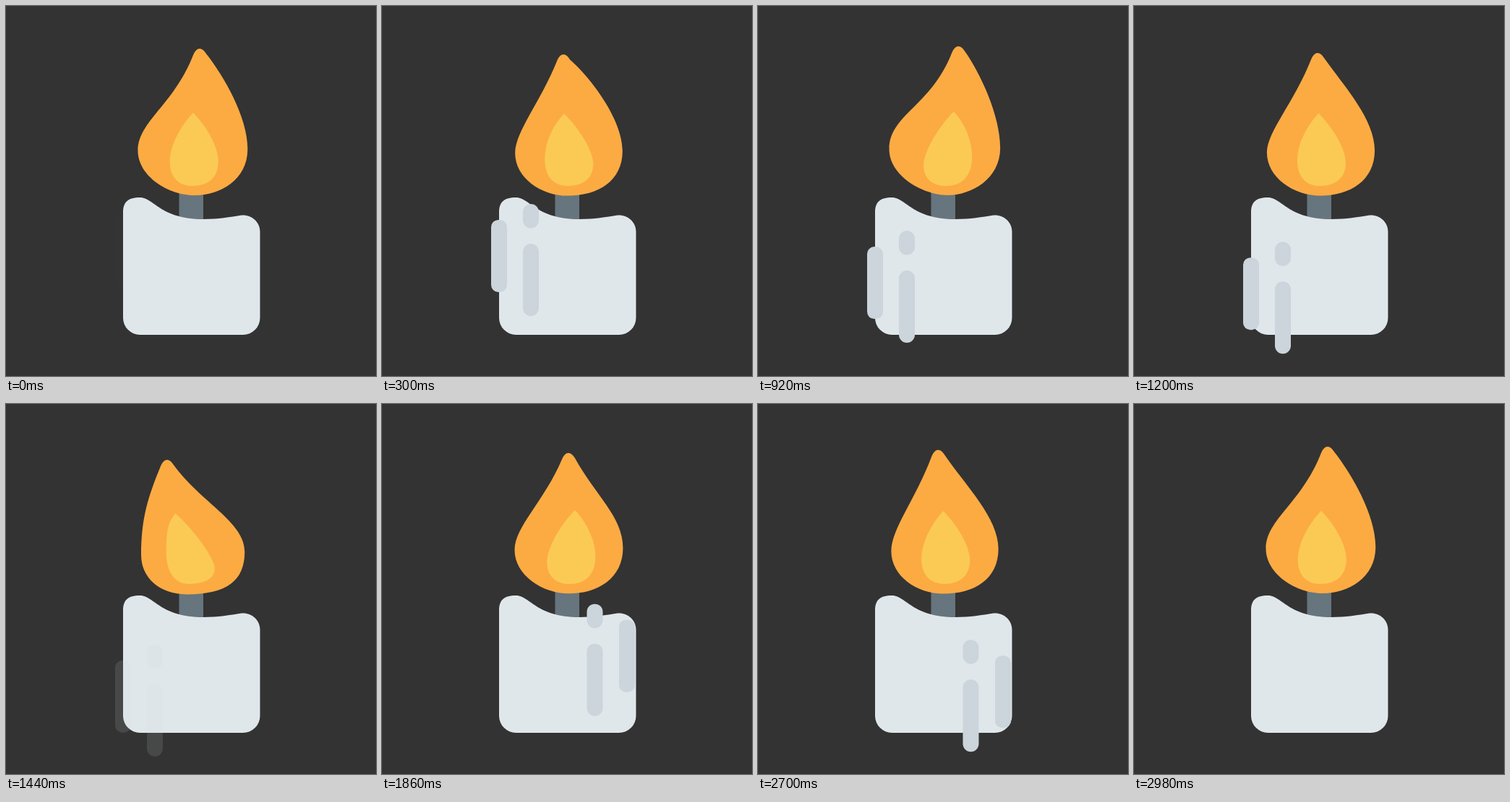
Recreate the animation shown at these times as an HTML page with a canvas. Size 512x512 px, loop 3000 ms.

```html
<!DOCTYPE html>
<html lang="en">
<head>
<meta charset="utf-8">
<title>Candle</title>
<style>
html, body { margin: 0; width: 100%; height: 100%; overflow: hidden; background: #333; }
canvas { display: block; width: 512px; height: 512px; }
</style>
</head>
<body>
<canvas id="stage" width="512" height="512"></canvas>
<script>
const ctx = document.getElementById('stage').getContext('2d');
const LOOP = 3000;
const HALF = LOOP / 2;
const color = {
  back: '#333333', wax: '#e0e7eb', drip: '#cbd5db',
  wick: '#67757e', flame: '#fcab43', core: '#fbca55'
};

// Sway poses: tip of the flame, tip of the core, drop of the right shoulder
const sway = [
  { t: 0, x: 267, y: 59, core: 259, drop: 38 },
  { t: 500, x: 241, y: 71.5, core: 248, drop: 30 },
  { t: 960, x: 277, y: 55.5, core: 271.5, drop: 38 },
  { t: 1500, x: 220, y: 78, core: 233, drop: 60 },
  { t: 2000, x: 265.5, y: 65.5, core: 275, drop: 57 },
  { t: 2500, x: 238, y: 66, core: 255, drop: 58 }
];

const ease = p => p * p * (3 - 2 * p);
const clamp = v => Math.max(0, Math.min(1, v));

function poseAt(t) {
  const i = sway.findLastIndex(s => s.t <= t);
  const a = sway[i];
  const b = sway[i + 1] || { ...sway[0], t: LOOP };
  const k = ease((t - a.t) / (b.t - a.t));
  const at = key => a[key] + (b[key] - a[key]) * k;
  return { x: at('x'), y: at('y'), core: at('core'), drop: at('drop') };
}

// The sides, base and handles all follow from how far the tip leans.
function drawFlame({ x, y, drop }) {
  const lean = x - 252;
  const rx = 333 + lean * 0.09, ry = 200 - lean * 0.15;
  const lx = 184 - lean * 0.1, ly = 203 - lean * 0.2;
  const bx = 257.5 + lean * 0.25, by = 262.5 - lean * 0.03;
  const rk = 0.55 - lean * 0.005, lk = 0.5 - lean * 0.003;
  const grip = 28 + Math.abs(lean) * 0.8;
  ctx.fillStyle = color.flame;
  ctx.beginPath();
  ctx.moveTo(x - 8, y + 9);
  ctx.bezierCurveTo(x - 3, y - 2.7, x + 4, y - 2.7, x + 10, y + 7);
  ctx.bezierCurveTo(x + 39 - lean * 0.3, y + drop, rx, 157 - lean * 0.2, rx, ry);
  ctx.bezierCurveTo(rx, ry + (by - ry) * 0.67, bx + (rx - bx) * rk, by, bx, by);
  ctx.bezierCurveTo(bx + (lx - bx) * lk, by, lx, ly + (by - ly) * 0.58, lx, ly);
  ctx.bezierCurveTo(lx, ly - grip, x - 18 - (x - lx) * 0.2, 134 + lean * 0.2, x - 8, y + 9);
  ctx.fill();
}

function drawCore({ core: x }) {
  const lean = x - 258;
  const y = 148 - lean * 0.15, base = 249;
  const rx = 293.5 + lean * 0.2, ry = 216 - lean * 0.5;
  const lx = 226.5 + lean * 0.2, ly = 215 + lean * 0.4;
  const bx = 258 + lean * 0.2;
  const grip = sx => 34 - 0.35 * Math.abs(sx - x);
  ctx.fillStyle = color.core;
  ctx.beginPath();
  ctx.moveTo(x, y);
  ctx.bezierCurveTo(x + 7 + (rx - x) * 0.3, y + (ry - y) * 0.26, rx, ry - grip(rx), rx, ry);
  ctx.bezierCurveTo(rx, ry + (base - ry) * 0.65, bx + (rx - bx) * 0.6, base, bx, base);
  ctx.bezierCurveTo(bx + (lx - bx) * 0.6, base, lx, ly + (base - ly) * 0.65, lx, ly);
  ctx.bezierCurveTo(lx, ly - grip(lx), x - 7 + (lx - x) * 0.3, y + (ly - y) * 0.26, x, y);
  ctx.fill();
}

function drawCandle() {
  ctx.fillStyle = color.wick;
  ctx.fillRect(239.5, 245, 33.5, 52);
  ctx.fillStyle = color.wax;
  ctx.beginPath();
  ctx.moveTo(162, 286);
  ctx.bezierCurveTo(162, 271, 169, 265, 185, 265);
  ctx.bezierCurveTo(205, 265, 213, 295, 273, 295);
  ctx.bezierCurveTo(294, 295, 310, 292, 326, 289.5);
  ctx.bezierCurveTo(340, 288.5, 351.5, 299, 351.5, 312);
  ctx.arcTo(351.5, 455, 328, 455, 23.5);
  ctx.arcTo(162, 455, 162, 432, 23.5);
  ctx.closePath();
  ctx.fill();
}

function pill(x, y, h, r) {
  ctx.beginPath();
  ctx.roundRect(x, y, 22, h, r);
  ctx.fill();
}

function drawDrips(p, inner, side) {
  const y = 66 * ease(p);
  ctx.globalAlpha = clamp(Math.min(p / 0.2, (0.985 - p) / 0.18));
  ctx.fillStyle = color.drip;
  pill(inner, 267 + y, 33.5, 11);
  pill(inner, 322 + y, 100, 11);
  pill(side, 289 + y, 100, 10);
  ctx.globalAlpha = 1;
}

function draw(t) {
  ctx.fillStyle = color.back;
  ctx.fillRect(0, 0, 512, 512);
  drawCandle();
  const p = (t % HALF) / HALF;
  if (t < HALF) drawDrips(p, 195, 151);
  else drawDrips(p, 283.5, 328);
  const pose = poseAt(t);
  drawFlame(pose);
  drawCore(pose);
}

const start = performance.now();
function tick() {
  draw(Math.max(0, performance.now() - start) % LOOP);
  requestAnimationFrame(tick);
}
tick();
</script>
</body>
</html>
```
